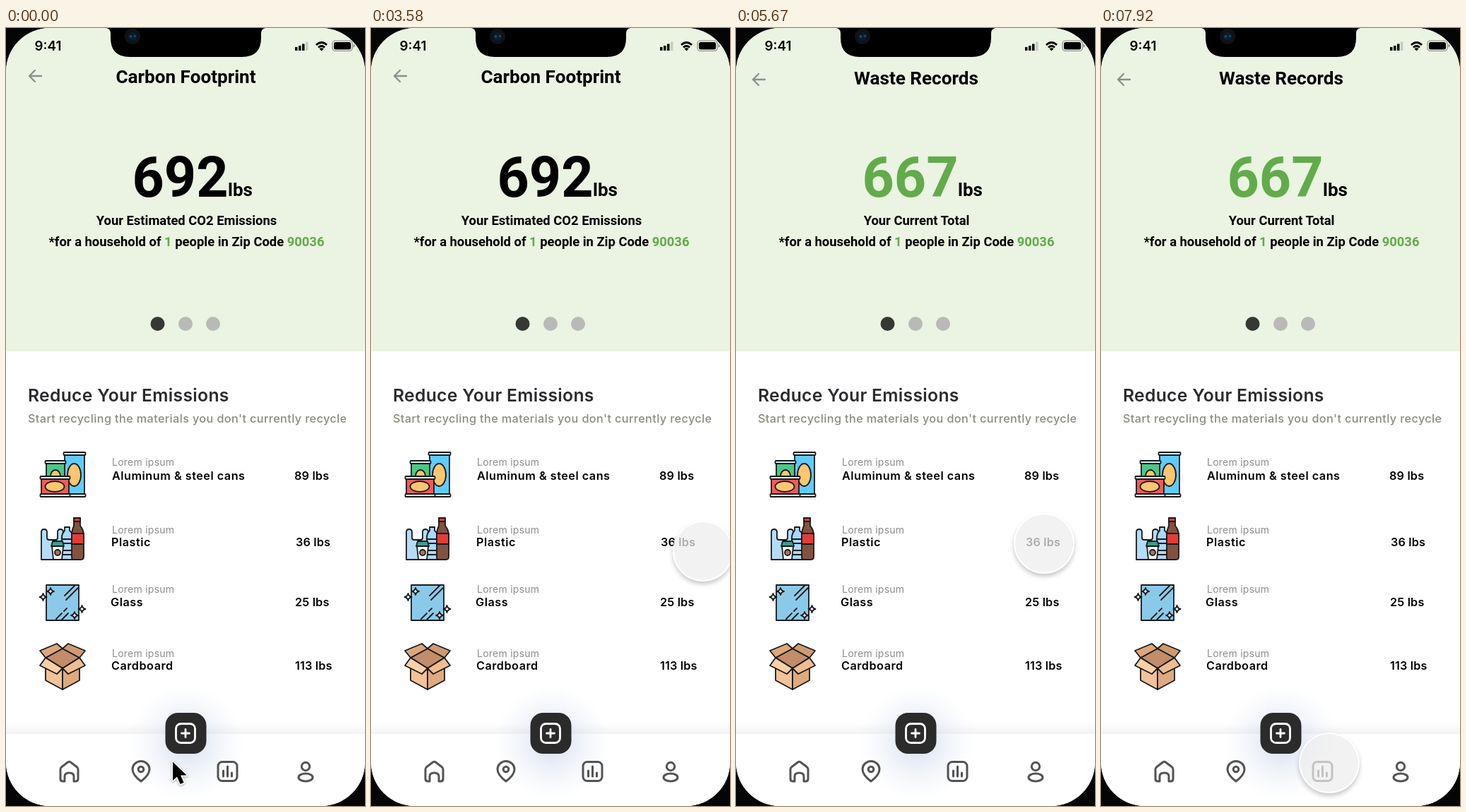
These frames come from a looping animation (508 px wide and 1102 px high, 8000 ms). An HTML page:

```html
<!DOCTYPE html>
<html lang="en">
<head>
<meta charset="utf-8">
<title>Carbon Footprint</title>
<style>
html, body { margin: 0; width: 100%; height: 100%; overflow: hidden; background: #000; }
svg { position: absolute; left: 0; top: 0; display: block; }
text { font-family: Inter, sans-serif; }
.head text { font-family: Roboto, sans-serif; font-weight: 700; }
.mid { text-anchor: middle; }
.title { font-size: 26.1px; }
.total { font-size: 79px; }
.unit { font-size: 26px; }
.note { font-size: 18.4px; }
.green { fill: #62ab4b; }
.name, .mass { font-size: 16.2px; font-weight: 600; }
.name { letter-spacing: .52px; }
.mass { letter-spacing: .2px; }
.kind { font-size: 14px; letter-spacing: .25px; fill: #8c8c8c; }
.ink { stroke: #17191c; stroke-width: 1.8; stroke-linejoin: round; stroke-linecap: round; }
.line { fill: none; stroke-linejoin: round; stroke-linecap: round; }
.before { animation: before 8s infinite; }
.after { animation: after 8s infinite; }
.pointer {
  filter: drop-shadow(0 1.5px 1.5px rgba(0, 0, 0, .35));
  animation: pointer 8s infinite step-end;
}
.touch {
  position: absolute; left: -43px; top: -43px; width: 86px; height: 86px;
  box-sizing: border-box; border: 2px solid #fffd; border-radius: 50%;
  background: rgba(238, 238, 238, .73); background-clip: padding-box;
  box-shadow: 0 4px 6px rgba(0, 0, 0, .22);
  animation: touch 8s infinite linear;
}
@keyframes before {
  0%, 66.6% { opacity: 1; animation-timing-function: ease-out; }
  70.3%, 100% { opacity: 0; }
}
@keyframes after {
  0%, 66.6% { opacity: 0; animation-timing-function: ease-out; }
  70.3%, 100% { opacity: 1; }
}
@keyframes pointer { 0% { opacity: 1; } 4.1%, 100% { opacity: 0; } }
@keyframes touch {
  0%, 41.6% { transform: translate(560px, 770px); }
  44.75% { transform: translate(470px, 741px); animation-timing-function: ease-out; }
  47.9% { transform: translate(436px, 730px); }
  90.6% { transform: translate(436px, 730px); animation-timing-function: ease-in-out; }
  96.9% { transform: translate(325px, 1022px); animation-timing-function: ease-out; }
  98.5%, 100% { transform: translate(323px, 1041px); }
}
#stage { position: relative; width: 508px; height: 1102px; overflow: hidden; }
</style>
</head>
<body>
<div id="stage">
<svg width="508" height="1102" viewBox="0 0 508 1102">
  <defs>
    <clipPath id="screen"><rect width="508" height="1102" rx="62"/></clipPath>
    <radialGradient id="glow">
      <stop offset="0" stop-color="#bfcbe6" stop-opacity=".65"/>
      <stop offset=".45" stop-color="#cbd5eb" stop-opacity=".34"/>
      <stop offset="1" stop-color="#e0e6f4" stop-opacity="0"/>
    </radialGradient>
    <linearGradient id="lift" x2="0" y2="1">
      <stop offset="0" stop-color="#000" stop-opacity="0"/>
      <stop offset="1" stop-color="#000" stop-opacity=".05"/>
    </linearGradient>
    <path id="back" class="line" d="M18 0H1M9-8L1 0l8 8" stroke="#8d8e8c" stroke-width="2.3"/>
    <path id="spark" class="ink" fill="#fff" d="M0-5Q.8-.8 5 0Q.8.8 0 5Q-.8.8-5 0Q-.8-.8 0-5z"/>
  </defs>
  <rect width="508" height="1102" fill="#050506"/>
  <g clip-path="url(#screen)">
    <rect width="508" height="1102" fill="#fff"/>
    <rect width="508" height="458" fill="#ebf3e2"/>

    <g class="head">
      <g class="before">
        <use href="#back" x="32" y="68"/>
        <text class="title mid" x="254.5" y="78">Carbon Footprint</text>
        <text class="total" x="178.5" y="238.500">692</text>
        <text class="note mid" x="255.5" y="279">Your Estimated CO2 Emissions</text>
      </g>
      <g class="after">
        <use href="#back" x="23" y="73"/>
        <text class="title mid" x="255" y="80">Waste Records</text>
        <text class="total green" x="178.5" y="238.500">667</text>
        <text class="note mid" x="255.5" y="279">Your Current Total</text>
      </g>
      <text class="unit" x="314" y="238">lbs</text>
      <text class="note mid" x="255.5" y="309">*for a household of <tspan class="green">1</tspan> people in Zip Code <tspan class="green">90036</tspan></text>
    </g>
    <circle cx="214.5" cy="419" r="10" fill="#363836"/>
    <circle cx="254" cy="419" r="10" fill="#b9bab8"/>
    <circle cx="293" cy="419" r="10" fill="#b9bab8"/>

    <text x="31" y="529" font-size="24.7" font-weight="600" letter-spacing=".3" fill="#2b2a2e">Reduce Your Emissions</text>
    <text x="31" y="559" font-size="16.2" font-weight="500" letter-spacing=".4" fill="#8a8c80">Start recycling the materials you don't currently recycle</text>

    <text class="kind" x="150" y="620">Lorem ipsum</text>
    <text class="name" x="150" y="640">Aluminum &amp; steel cans</text>
    <text class="mass" x="408" y="640">89 lbs</text>
    <text class="kind" x="150" y="716">Lorem ipsum</text>
    <text class="name" x="149" y="734">Plastic</text>
    <text class="mass" x="410" y="734">36 lbs</text>
    <text class="kind" x="150" y="800">Lorem ipsum</text>
    <text class="name" x="148" y="819">Glass</text>
    <text class="mass" x="409" y="819">25 lbs</text>
    <text class="kind" x="150" y="891">Lorem ipsum</text>
    <text class="name" x="149" y="909">Cardboard</text>
    <text class="mass" x="409" y="909">113 lbs</text>

    <!-- cans -->
    <g class="ink">
      <path fill="#60ccfb" d="M83 605h28v55H83z"/>
      <rect x="81.500" y="601" width="31" height="4" rx="1" fill="#d9edf7"/>
      <rect x="81.500" y="660" width="31" height="4" rx="1" fill="#d9edf7"/>
      <ellipse cx="96.500" cy="633" rx="9.500" ry="16" fill="#fdc66f"/>
      <path fill="#4cc884" d="M57 617h26v18H57z"/>
      <rect x="55.500" y="613" width="29" height="4" rx="1" fill="#d9edf7"/>
      <path fill="#fdc66f" d="M63 635a7 9 0 0 1 14 0z"/>
      <path fill="#f25b56" d="M50 639h39v21H50z"/>
      <rect x="48.500" y="635" width="42" height="4" rx="1" fill="#d9edf7"/>
      <rect x="48.500" y="660" width="42" height="4" rx="1" fill="#d9edf7"/>
      <ellipse cx="69" cy="649.500" rx="13.500" ry="7.500" fill="#fdc66f"/>
    </g>
    <!-- plastic -->
    <g class="ink">
      <path fill="#b4dcf8" d="M50 753V714q0-4 4-4t4 4v8q0 3 3 3h9q3 0 3-3v-8q0-4 4-4t4 4v39z"/>
      <path fill="#a9dafa" d="M83 707h7v5q5 4 5 10v31H79v-31q0-6 4-10z"/>
      <path fill="none" d="M79 724h16M79 730h16M79 740h16M79 746h16"/>
      <path fill="#84513e" d="M96 694h9v11q5 6 5 13v31q0 4-4 4H95q-2 0-2-4v-31q0-7 3-13z"/>
      <path fill="#e53c36" d="M96 694h9v5h-9zM93 716h17v15H93z"/>
      <path fill="#f3f6f7" d="M65 734h16l-2 19H67z"/>
      <path fill="#3e9e8b" d="M66 727h14l2 7H64z"/>
      <circle cx="73" cy="743" r="4" fill="#a87550"/>
    </g>
    <!-- glass -->
    <g class="ink">
      <path fill="#8acae8" d="M57 789h46v50H57z"/>
      <path fill="none" d="M83 804l14-14M85 810l17-17M71 837l8-8M79 838l9-9M82 826l4-4"/>
      <use href="#spark" x="63" y="798"/>
      <use href="#spark" x="52.500" y="806"/>
      <use href="#spark" x="97" y="832"/>
      <use href="#spark" x="107.500" y="823"/>
    </g>
    <!-- cardboard -->
    <g class="ink">
      <path fill="#c28d68" d="M56 892l24-13 24 13-24 15z"/>
      <path fill="#f2c298" d="M56 892l24 15v30l-24-13z"/>
      <path fill="#dfaa7d" d="M104 892l-24 15v30l24-13z"/>
      <path fill="#dca77c" d="M56 892l24-13-8-7-24 10z"/>
      <path fill="#cf9a70" d="M104 892l-24-13 8-7 24 10z"/>
      <path fill="#fbd0a6" d="M56 892l24 15-8 8-24-12z"/>
      <path fill="#efbd90" d="M104 892l-24 15 8 8 24-12z"/>
    </g>

    <!-- navigation -->
    <rect y="984" width="508" height="16" fill="url(#lift)"/>
    <rect y="1000" width="508" height="102" fill="#fff"/>
    <circle cx="256" cy="1012" r="82" fill="url(#glow)"/>
    <rect x="225.500" y="970" width="58" height="58" rx="18" fill="#2b2b2b"/>
    <g class="line" stroke="#fff" stroke-width="2.800">
      <rect x="240.500" y="985.500" width="27" height="27" rx="7"/>
      <path d="M254 993.500v11M248.500 999h11"/>
    </g>
    <g class="line" stroke="#535353" stroke-width="3">
      <path d="M77 1050q0-2 2-3.500l8.500-6.500q2-1.500 4 0l8.500 6.500q2 1.500 2 3.500v13.500q0 3.500-3.500 3.500H96v-7q0-5-6.500-5t-6.500 5v7h-2.500q-3.500 0-3.500-3.500z"/>
      <path d="M191 1067q-12-9-12-17a12 11.500 0 0 1 24 0q0 8-12 17z"/>
      <circle cx="191" cy="1050" r="3.800"/>
      <rect x="300" y="1039.500" width="27" height="27" rx="6"/>
      <path d="M307.500 1052v8M313.500 1046v14M319.500 1055v5"/>
      <circle cx="424" cy="1046" r="5.700"/>
      <ellipse cx="424" cy="1061.500" rx="10" ry="5.500"/>
    </g>

    <!-- status bar -->
    <text x="40.500" y="32" font-size="18.800" font-weight="600">9:41</text>
    <path d="M409 27h3.500v5H409zM414 25h3.500v7H414zM419 22.500h3.500v9.500H419z"/>
    <path fill="#c5ccbe" d="M424 19.500h3.500V32H424z"/>
    <g class="line" stroke="#000" stroke-width="2.800" style="stroke-linecap:butt">
      <path d="M439 24q7.500-7 15 0M442 27.500q4.500-4 9 0"/>
    </g>
    <path d="M443.500 29.500q3-2.500 6 0l-3 3z"/>
    <rect x="462" y="18" width="28" height="14.500" rx="4" fill="none" stroke="#858a80" stroke-width="1.200"/>
    <rect x="464" y="20" width="24" height="10.500" rx="2.500"/>
    <path fill="#858a80" d="M491.500 23q2 0 2 2.300t-2 2.300z"/>

    <!-- notch -->
    <path d="M142 0q6 1 6 8v6q0 27 27 27h159q27 0 27-27V8q0-7 6-8z"/>
    <circle cx="179" cy="12" r="11" fill="#101218"/>
    <circle cx="179" cy="12" r="6" fill="#0c1c2b"/>
    <circle cx="176.500" cy="12" r="2" fill="#174a69"/>
    <circle cx="182.500" cy="11.500" r="1.800" fill="#1d466b"/>
  </g>
  <path class="pointer" d="M236 1039.500v26.500l6-5.600 4.600 10.600 5-2.200-4.500-10.200h8.600z" stroke="#fff" stroke-width="3.200" paint-order="stroke" stroke-linejoin="round"/>
</svg>
<div class="touch"></div>
</div>
</body>
</html>
```
